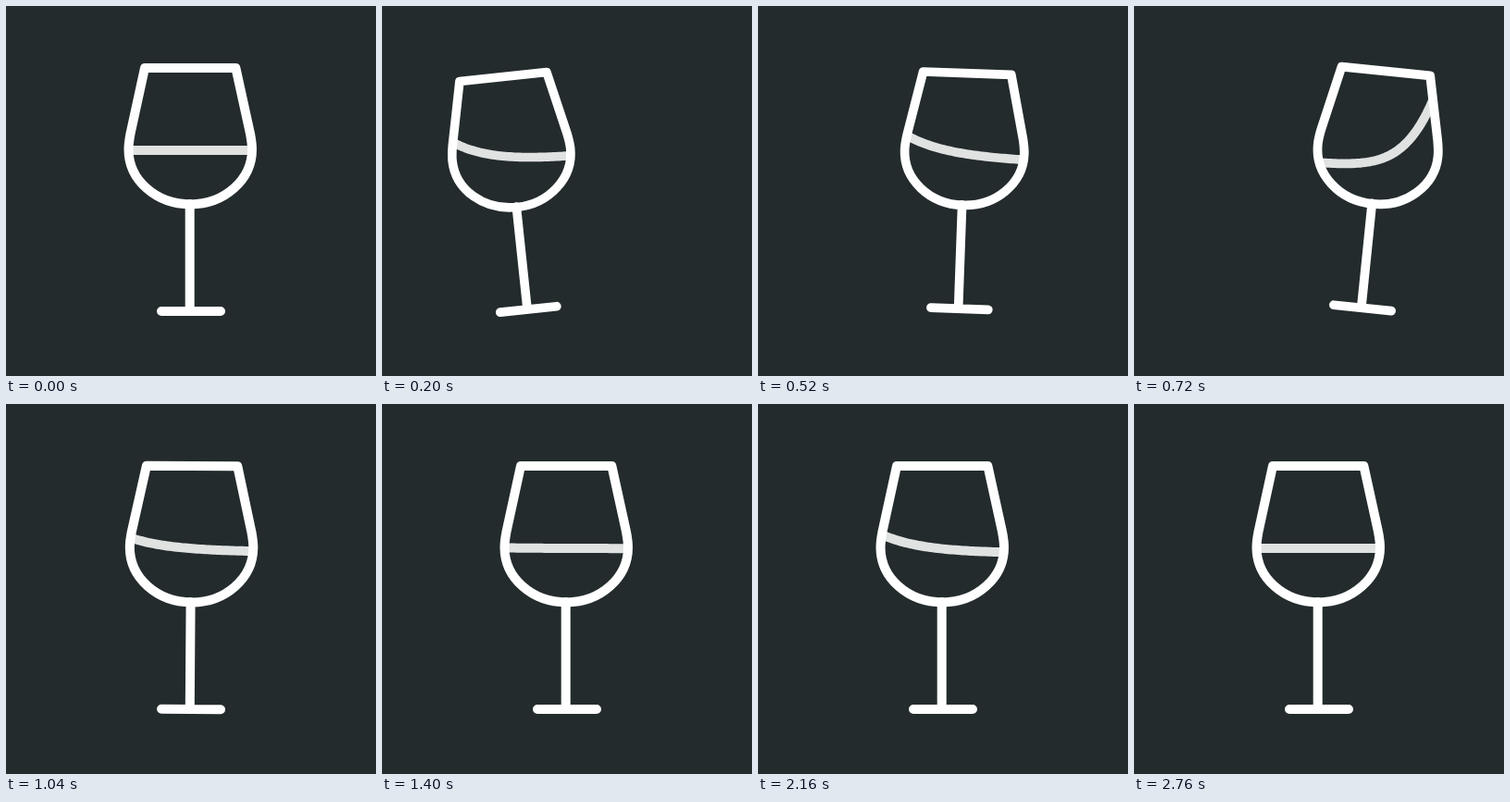
Animation, 400 px wide and 400 px high, one loop 2.84 s. Source, as an HTML page:

```html
<!DOCTYPE html>
<html lang="en">
<head>
<meta charset="utf-8">
<title>Swinging wine glass</title>
<style>
  html, body { margin: 0; width: 100%; height: 100%; overflow: hidden; background: #232b2d; }
  svg { display: block; width: 100%; height: 100%; }
</style>
</head>
<body>
<svg viewBox="0 0 400 400" fill="none" stroke="#fff" stroke-width="10" stroke-linecap="round" stroke-linejoin="round">
  <defs>
    <path id="bowl" d="M150 67H248.4L264 138C265.5 146 266 150 266 155C266 188 236 214.4 199.5 214.4C162 214.4 132.5 188 132.5 155C132.5 150 133 146 134.5 138Z"/>
    <clipPath id="inside"><use href="#bowl"/></clipPath>
  </defs>
  <g id="glass">
    <g clip-path="url(#inside)"><path id="wine" stroke="#e0e1e1"/></g>
    <use href="#bowl"/>
    <path d="M198.7 214V328M168 330H232"/>
  </g>
</svg>
<script>
const LOOP = 2840, STEP = 40;
const LEVEL = 156, MID = 200, HALF = 68;

// Turning points of the glass
const swing = [
  { t: 0, x: 0, y: 0, turn: 0, size: 1 },
  { t: 295, x: -68, y: 4.5, turn: -7.5, size: 0.952 },
  { t: 670, x: 64.4, y: 0, turn: 6.5, size: 0.976 },
  { t: 910, x: -5, y: 0, turn: -4, size: 1 },
  { t: 1040, x: 1, y: 0, turn: 0.4, size: 1 },
  { t: 1120, x: 0, y: 0, turn: 0, size: 1 }
];

// Crests of the wine: slope in the middle, and how sharply one side climbs
const slosh = [
  { t: 0, tilt: 0, curl: 0 },
  { t: 400, tilt: -22, curl: -3 },
  { t: 720, tilt: 27, curl: 2.6 },
  { t: 1140, tilt: -8, curl: -2 },
  { t: 1760, tilt: 14, curl: 0.3 },
  { t: 2160, tilt: -7, curl: -1.5 },
  { t: 2760, tilt: 0, curl: 0 }
];

const ease = u => u * u * u * (10 - 15 * u + 6 * u * u);

function poseAt(poses, t) {
  const i = poses.findIndex(p => p.t > t);
  if (i < 0) return poses[poses.length - 1];
  const a = poses[i - 1], b = poses[i];
  const k = ease((t - a.t) / (b.t - a.t));
  const pose = {};
  for (const key in a) pose[key] = a[key] + (b[key] - a[key]) * k;
  return pose;
}

// Exponential climb towards one wall; a plain slope when curl is near zero
function surface({ tilt, curl }) {
  const middle = LEVEL + tilt * tilt / 77;
  const points = [];
  for (let u = -1; u <= 1.001; u += 0.04) {
    const climb = Math.abs(curl) < 0.001 ? u : Math.expm1(curl * u) / curl;
    points.push(`${(MID + HALF * u).toFixed(2)} ${(middle - tilt * climb).toFixed(2)}`);
  }
  return 'M' + points.join('L');
}

const glass = document.getElementById('glass');
const wine = document.getElementById('wine');

function draw(ms) {
  const t = Math.floor((ms % LOOP) / STEP) * STEP;
  const { x, y, turn, size } = poseAt(swing, t);
  glass.setAttribute('transform',
    `translate(${MID + x} ${MID + y}) rotate(${turn}) scale(${size}) translate(${-MID} ${-MID})`);
  wine.setAttribute('d', surface(poseAt(slosh, t)));
}

const start = performance.now();
function tick() {
  draw(performance.now() - start);
  requestAnimationFrame(tick);
}
tick();
</script>
</body>
</html>
```
